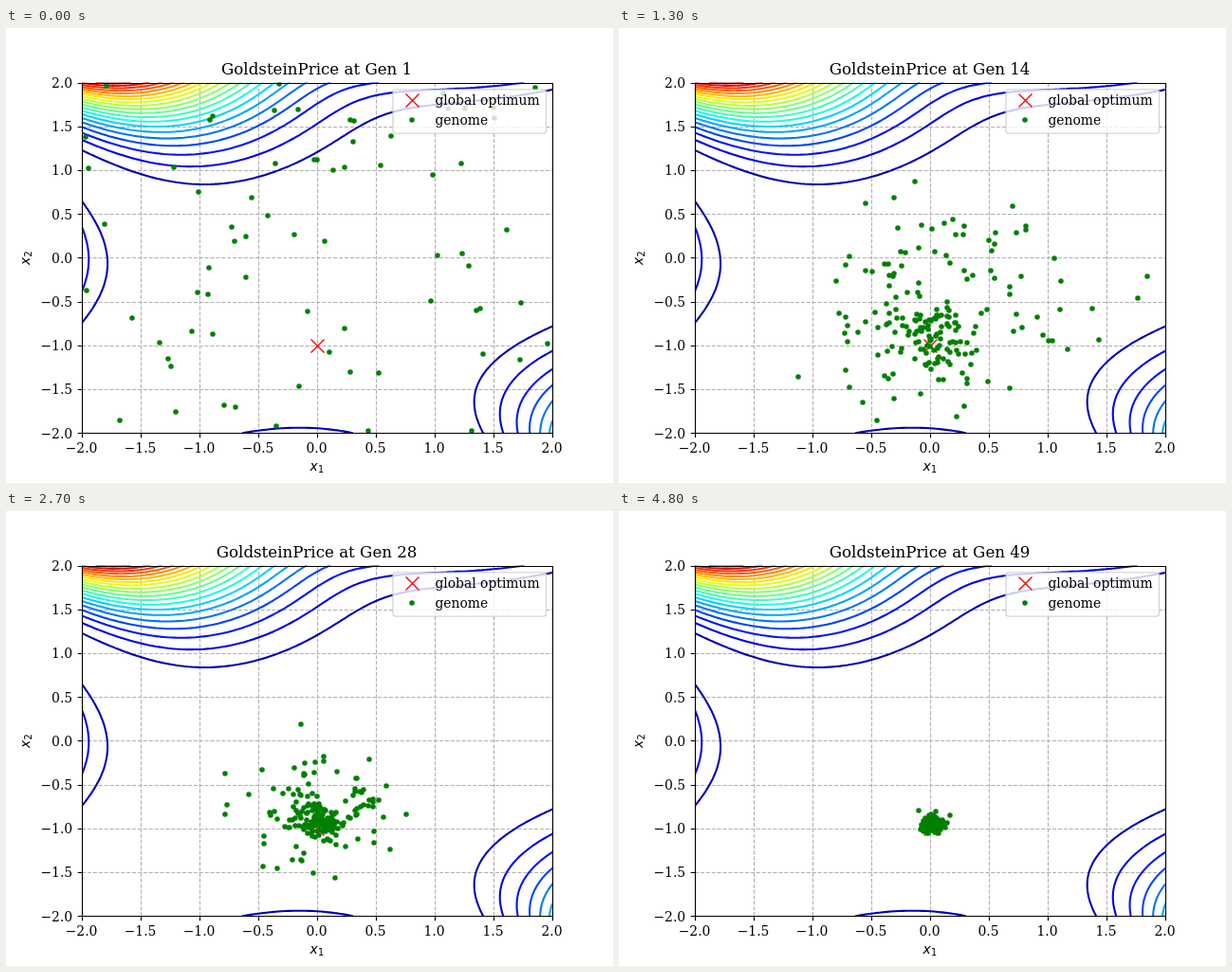
An HTML page that plays this animation: 640 px wide and 480 px high, repeating every 4.9 s.

```html
<!DOCTYPE html>
<html lang="en">
<head>
<meta charset="utf-8">
<style>
  html, body { margin: 0; width: 100%; height: 100%; overflow: hidden; background: #fff; }
  svg { display: block; }
  text { font: 13.89px "DejaVu Serif", "Noto Serif", serif; }
  #title { font-size: 16.67px; }
  .math { font-family: "DejaVu Sans", sans-serif; }
  .math.var { font-style: italic; }
  .math.sub { font-size: 9.72px; }
  .dots { fill: none; stroke: #008000; stroke-width: 5.56; stroke-linecap: round; }
  .cross { fill: none; stroke: #f00; stroke-width: 1.39; }
</style>
</head>
<body>
<svg width="640" height="480" viewBox="0 0 640 480">
  <clipPath id="plot"><rect x="80" y="57.6" width="497" height="370"/></clipPath>
  <path id="grid" fill="none" stroke="#b0b0b0" stroke-width="1.11" stroke-dasharray="4.11 1.78"/>
  <g id="contours" clip-path="url(#plot)" fill="none" stroke-width="2.083" stroke-linecap="round"/>
  <path class="cross" d="M321.5 328.5l14 14m0 -14l-14 14"/>
  <path id="genomes" class="dots" clip-path="url(#plot)"/>
  <path id="frame" fill="none" stroke="#000" stroke-width="1.11"/>
  <g id="labels"></g>
  <text id="title" x="327.6" y="49" text-anchor="middle"></text>
  <text class="math var" x="320.5" y="467">x</text>
  <text class="math sub" x="329" y="469.2">1</text>
  <g transform="translate(25 250) rotate(-90)">
    <text class="math var">x</text>
    <text class="math sub" x="8.5" y="2.2">2</text>
  </g>
  <rect x="408" y="64.9" width="161.5" height="46.2" rx="2.8" fill="#fff" fill-opacity=".8"
    stroke="#ccc" stroke-opacity=".8" stroke-width="1.39"/>
  <path class="cross" d="M421.5 69.5l14 14m0 -14l-14 14"/>
  <path class="dots" d="M428 97h0"/>
  <text x="452.4" y="81">global optimum</text>
  <text x="452.4" y="102">genome</text>
</svg>
<script>
const $ = id => document.getElementById(id);
const px = x => 328 + 124 * x;
const py = y => 242.4 - 92.4 * y;
const snap = v => Math.floor(v + 0.5) + 0.5;

function drawAxes() {
  let grid = "", frame = "M80.5 58.5H576.5V427.5H80.5Z", labels = "";
  for (let i = -4; i <= 4; i++) {
    const v = i / 2, x = snap(px(v)), y = snap(py(v));
    const name = v.toFixed(1).replace("-", "\u2212");
    grid += `M${x} 427.2V57.6M80 ${y}H576`;
    frame += `M${x} 427.5v4.86M80.5 ${y}h-4.86`;
    labels += `<text x="${px(v) - 0.4}" y="448" text-anchor="middle">${name}</text>` +
      `<text x="70.2" y="${Math.round(py(v) + 5.3)}" text-anchor="end">${name}</text>`;
  }
  $("grid").setAttribute("d", grid);
  $("frame").setAttribute("d", frame);
  $("labels").innerHTML = labels;
}

function goldsteinPrice(x, y) {
  const a = (x + y + 1) ** 2 * (19 - 14 * x + 3 * x * x - 14 * y + 6 * x * y + 3 * y * y);
  const b = (2 * x - 3 * y) ** 2 * (18 - 32 * x + 12 * x * x + 48 * y - 36 * x * y + 27 * y * y);
  return (1 + a) * (30 + b);
}

// Each channel of the jet colour map is a clipped tent.
function jet(t) {
  const tent = (rise, fall) => Math.round(255 * Math.max(0, Math.min(1, rise, fall)));
  const r = tent((t - .35) / .31, 1 - (t - .89) / .22);
  const g = tent((t - .125) / .25, (.91 - t) / .27);
  const b = tent(.5 + t / .22, (.65 - t) / .31);
  return `rgb(${r},${g},${b})`;
}

// Marching squares over the whole plot.
function contourPath(level, z, n) {
  const at = i => -2 + 4 * i / n;
  let d = "";
  for (let i = 0; i < n; i++) for (let j = 0; j < n; j++) {
    const corners = [[i, j], [i + 1, j], [i + 1, j + 1], [i, j + 1]];
    const hits = [];
    corners.forEach(([ax, ay], k) => {
      const [bx, by] = corners[(k + 1) % 4];
      const za = z[ax][ay] - level, zb = z[bx][by] - level;
      if (za < 0 === zb < 0) return;
      const f = za / (za - zb);
      hits.push(px(at(ax + (bx - ax) * f)).toFixed(2) + " " + py(at(ay + (by - ay) * f)).toFixed(2));
    });
    for (let k = 0; k + 1 < hits.length; k += 2) d += `M${hits[k]}L${hits[k + 1]}`;
  }
  return d;
}

function drawContours() {
  const n = 120, step = 50000;
  const z = Array.from({ length: n + 1 }, (_, i) =>
    Array.from({ length: n + 1 }, (_, j) => goldsteinPrice(-2 + 4 * i / n, -2 + 4 * j / n)));
  let html = "";
  for (let k = 1; k <= 20; k++)
    html += `<path stroke="${jet(k / 21)}" d="${contourPath(k * step, z, n)}"/>`;
  $("contours").innerHTML = html;
}

function seeded(seed) {
  let s = seed * 7919;
  return () => {
    s = s + 0x6D2B79F5 | 0;
    let t = Math.imul(s ^ s >>> 15, 1 | s);
    t = t + Math.imul(t ^ t >>> 7, 61 | t) ^ t;
    return ((t ^ t >>> 14) >>> 0) / 4294967296;
  };
}

// Scattered genomes give way to a wide cloud and a core, both closing in on (0, -1).
function population(gen) {
  const rand = seeded(gen);
  const normal = () => Math.sqrt(-2 * Math.log(1 - rand())) * Math.cos(2 * Math.PI * rand());
  const scattered = Math.max(0, 1 - (gen / 12) ** 2);
  const inCore = 0.1 + 0.8 * gen / 49;
  const core = 0.25 * Math.exp(-gen / 28);
  const wide = 0.05 + 0.55 * Math.exp(-((gen / 33) ** 3));
  const count = 70 + 130 * (1 - scattered);
  let d = "";
  for (let i = 0; i < count; i++) {
    let x, y;
    if (rand() < scattered) {
      x = rand() * 4 - 2;
      y = rand() * 4 - 2;
    } else {
      const spread = rand() < inCore ? core : wide;
      x = 0.02 + spread * normal();
      y = -1 + spread * (0.8 + normal());
    }
    d += `M${Math.round(px(x))} ${Math.round(py(y))}h0`;
  }
  return d;
}

let shown = 0;
function draw() {
  const gen = Math.floor(performance.now() % 4900 / 100) + 1;
  if (gen !== shown) {
    shown = gen;
    $("title").textContent = "GoldsteinPrice at Gen " + gen;
    $("genomes").setAttribute("d", population(gen));
  }
  requestAnimationFrame(draw);
}

drawAxes();
drawContours();
draw();
</script>
</body>
</html>
```
